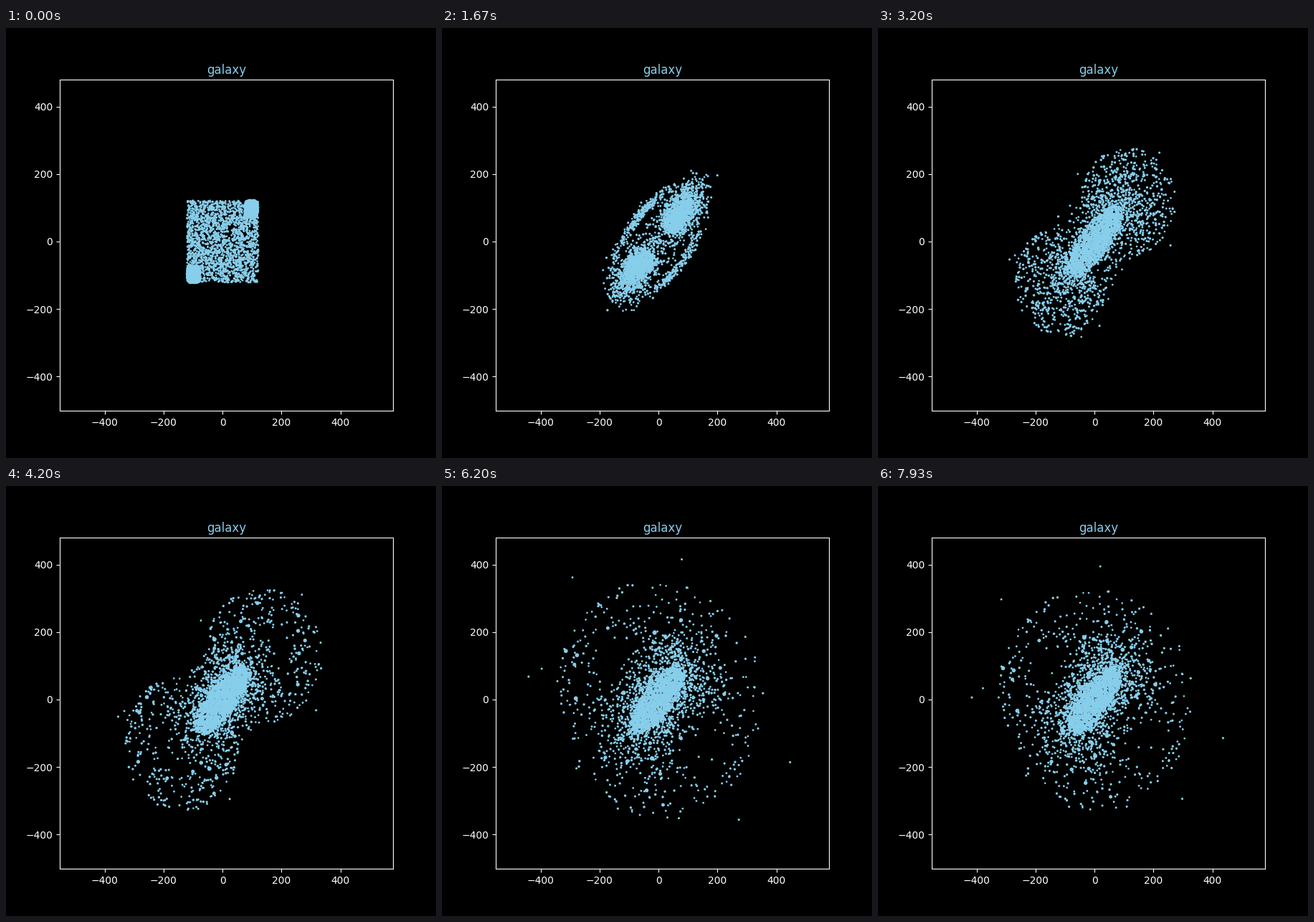
A matplotlib script that plays this animation: 600x600 px, repeating every 8000 ms.

```python
import numpy as np
import matplotlib.pyplot as plt
from matplotlib.animation import FuncAnimation

FRAMES, STEP = 125, 64
N_SQUARE, N_RIM, N_CORE = 1950, 480, 1300
TILT = np.radians(49)
AXIS = np.array([np.cos(TILT), np.sin(TILT)])
ACROSS = np.array([-AXIS[1], AXIS[0]])

rng = np.random.default_rng(12)


def tilted(u, v):
    """Positions from distances along and across the bar."""
    return np.outer(u, AXIS) + np.outer(v, ACROSS)


def polar(r, angle):
    return np.column_stack([r * np.cos(angle), r * np.sin(angle)])


def ease(t, start, length):
    x = np.clip((t - start) / length, 0, 1)
    return x * x * (3 - 2 * x)


def mix(a, b, s):
    return a + (b - a) * s


def normals(n):
    return np.clip(rng.normal(size=(2, n)), -2.4, 2.4)


class Rim:
    """Outer stars: square, ellipse, two lobes, then a breathing halo."""

    def __init__(self, start):
        n = len(start)
        u, v = start @ AXIS, start @ ACROSS
        self.start = start
        self.side = np.sign(u)[:, None]
        self.p = rng.random(n) + (rng.random(n) < 0.03) * rng.uniform(0, 0.8, n)
        phi = np.arctan2(v, u) + rng.normal(0, 0.15, n)
        rho = np.where(rng.random(n) < 0.15, rng.random(n), rng.normal(0.95, 0.07, n))
        self.ring = tilted(225 * rho * np.cos(phi), 108 * rho * np.sin(phi))
        psi = TILT + rng.uniform(-2.4, 2.4, n)
        self.reach = polar(np.sqrt(0.2 + 0.8 * self.p), psi)
        wide = self.lobe(1) * self.side
        dev = np.arctan2(wide @ ACROSS, wide @ AXIS)
        self.angle = TILT + 1.4 * dev + rng.normal(0, 0.14, n) + np.where(u < 0, np.pi, 0)

    def lobe(self, grow):
        centre = np.array([112, 117]) + grow * np.array([28, 15])
        return self.side * (centre + self.reach * (157 + 43 * grow))

    def at(self, t):
        breath = np.cos(np.pi * (t - 4.2))
        r = 120 + 188 * self.p + (10 + 38 * self.p) * breath
        halo = polar(r, self.angle + 0.08 * (t - 5.2))
        pos = mix(self.start, self.ring, ease(t, 0, 1.8))
        pos = mix(pos, self.lobe(ease(t, 2.9, 1.4)), ease(t, 1.5, 1.8))
        return mix(pos, halo, ease(t, 4.1, 1.1))


class Cloud:
    """Stars that gather round the clusters and later circle in the haze."""

    def __init__(self, start):
        n = len(start)
        self.start = start
        self.side = np.sign(start @ AXIS)
        self.g, self.h = normals(n)
        self.radius = rng.uniform(5, 30, n)
        self.speed = rng.uniform(1.5, 3.5, n)
        self.phase = rng.uniform(0, 2 * np.pi, n)

    def at(self, t):
        spread, fall = ease(t, 1.67, 1.5), ease(t, 2.9, 1.3)
        haze = ease(t, 4.2, 2)
        u = self.side * (122 - 68 * fall) + (50 + 20 * spread + 12 * haze) * self.g
        v = (29 + 23 * spread + 9 * haze) * self.h
        eddy = polar(self.radius, self.phase + self.speed * t)
        return mix(self.start, tilted(u, v), ease(t, 0, 1.9)) + ease(t, 2, 1.5) * eddy


class Core:
    """Two corner clusters that fall together into a bar."""

    def __init__(self, n):
        side = np.where(np.arange(n) % 2, 1, -1)
        angle = rng.uniform(0, 2 * np.pi, n)
        round_off = (np.cos(angle) ** 4 + np.sin(angle) ** 4) ** 0.25
        blob = polar(np.sqrt(rng.random(n)) / round_off, angle)
        self.start = side[:, None] * np.array([98, 97]) + blob * [23, 26]
        self.stretched = tilted(side * (35 + rng.gamma(2.5, 28, n)), 23 * normals(n)[0])
        self.length, self.width = np.array([[126], [50]]) * rng.random((2, n)) ** 0.45
        self.speed = rng.uniform(1.2, 2.4, (2, n))
        self.phase = rng.uniform(0, 2 * np.pi, (2, n))

    def at(self, t):
        fall = mix(self.start, self.stretched, min(t / 1.67, 1.1) ** 2)
        swing = np.cos(self.speed * t + self.phase)
        u = self.length * swing[0]
        v = self.width * swing[1] * np.sqrt(1 - (u / 140) ** 2)
        return mix(fall, tilted(u, v), ease(t, 1.5, 1.6))


# uniform square: stars far from the diagonal form the rim
square = rng.uniform(-121, 121, (N_SQUARE, 2))
square = square[np.argsort(-np.abs(square @ ACROSS))]
groups = [Rim(square[:N_RIM]), Cloud(square[N_RIM:]), Core(N_CORE)]

# diameters in pixels; a few stars grow by merging
count = N_SQUARE + N_CORE
size = rng.uniform(2.6, 3.5, count)
growth = np.where(rng.random(count) < 0.03, rng.uniform(1.5, 3, count), 0)

fig = plt.figure(figsize=(6, 6), dpi=100, facecolor="black")
ax = fig.add_axes([0.125, 0.11, 0.775, 0.77], facecolor="black")
ax.set_xlim(-552.4, 578.1)
ax.set_ylim(-501.5, 480)
ax.set_xticks(range(-400, 401, 200))
ax.set_yticks(range(-400, 401, 200))
ax.tick_params(colors="white")
ax.spines[:].set_color("white")
ax.set_title("galaxy", color="skyblue")
stars = ax.scatter(np.zeros(count), np.zeros(count), c="skyblue", linewidths=0)


def draw(i):
    t = i * STEP / 1000
    stars.set_offsets(np.concatenate([g.at(t) for g in groups]))
    px = size + growth * ease(t, 2.8, 1.2)
    stars.set_sizes((px * 0.72) ** 2)
    return (stars,)


anim = FuncAnimation(fig, draw, frames=FRAMES, interval=STEP,
                     init_func=lambda: draw(0), repeat=True, repeat_delay=0)
plt.show()
```
